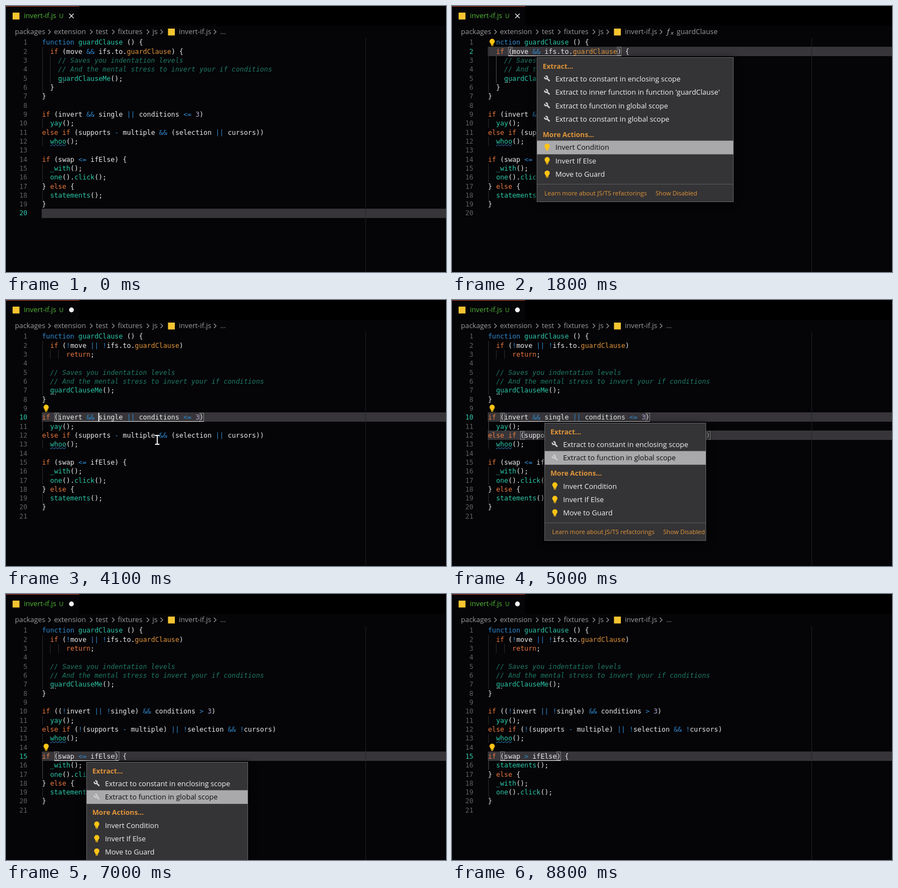
Recreate the animation shown at these times as an HTML page with a canvas. Size 800 by 483 pixels, loop 8.9 s.

```html
<!DOCTYPE html>
<html lang="en">
<head>
<meta charset="utf-8">
<title>Invert if</title>
<style>
html, body { margin: 0; width: 100%; height: 100%; overflow: hidden; background: #050407; }
canvas { display: block; }
</style>
</head>
<body>
<canvas id="stage" width="800" height="483"></canvas>
<script>
const ctx = document.getElementById('stage').getContext('2d');
const LOOP = 8900, STEP = 100, BLINK = 530;
const LEFT = 65.5, TOP = 58, CHAR = 7.34, ROW = 16.32;
const MONO = '12.2px "DejaVu Sans Mono", monospace';
const UI = '13px "Open Sans", "Noto Sans", sans-serif';
const CRUMB = '12.8px "Open Sans", "Noto Sans", sans-serif';
const BOLD = 'bold 12.6px "Open Sans", "Noto Sans", sans-serif';
const SMALL = '11.1px "Open Sans", "Noto Sans", sans-serif';
const C = {
  bg: '#050407', text: '#ececec', blue: '#2f8bd0', teal: '#2bc9aa', orange: '#e9793f',
  gold: '#e0953a', comment: '#1d7a66', number: '#b3a5d3', gutter: '#5f6064', row: '#373539',
  guide: '#29292c', activeGuide: '#48484b', crumb: '#9a9a9c', bulb: '#ffc414', js: '#f5c431'
};

const guardBefore = `function guardClause () {
  if (move && ifs.to.guardClause) {
    // Saves you indentation levels
    // And the mental stress to invert your if conditions
    guardClauseMe();
  }
}
`;
const guardAfter = `function guardClause () {
  if (!move || !ifs.to.guardClause)
      return;
  
  // Saves you indentation levels
  // And the mental stress to invert your if conditions
  guardClauseMe();
}
`;
const chain = `
if (invert && single || conditions <= 3)
  yay();
else if (supports - multiple && (selection || cursors))
  whoo();
`;
const chainInverted = `
if ((!invert || !single) && conditions > 3)
  yay();
else if (!(supports - multiple) || !selection && !cursors)
  whoo();
`;
const swap = `
if (swap <= ifElse) {
  _with();
  one().click();
} else {
  statements();
}
`;
const swapped = `
if (swap > ifElse) {
  statements();
} else {
  _with();
  one().click();
}
`;
const file = (...parts) => parts.join('').split('\n');
const untouched = file(guardBefore, chain, swap);
const guarded = file(guardAfter, chain, swap);
const inverted = file(guardAfter, chainInverted, swap);
const finished = file(guardAfter, chainInverted, swapped);

// pairs: [line, column, line, column] of matching brackets
const scenes = [
  { at: -600, code: untouched, lines: [20], carets: [[20, 0]], pairs: [] },
  { at: 500, code: untouched, lines: [2], carets: [[2, 12]], pairs: [[2, 5, 2, 32]], inFunction: true, bulb: true },
  { at: 2300, code: guarded, lines: [5], carets: [[5, 12]], pairs: [[1, 24, 8, 0]], inFunction: true, bulb: true },
  { at: 3600, code: guarded, lines: [10], carets: [[10, 14]], pairs: [[10, 3, 10, 39]], bulb: true },
  { at: 4300, code: guarded, lines: [10, 12], carets: [[10, 14], [12, 28]], pairs: [[10, 3, 10, 39], [12, 8, 12, 54]], bulb: true },
  { at: 5400, code: inverted, lines: [10, 12], carets: [[10, 16], [12, 28]], pairs: [[10, 4, 10, 23], [12, 10, 12, 30]], underline: '#d98732', bulb: true },
  { at: 6500, code: inverted, lines: [15], carets: [[15, 11]], pairs: [[15, 3, 15, 18]], bulb: true },
  { at: 7900, code: finished, lines: [15], carets: [[15, 11]], pairs: [[15, 3, 15, 17]], bulb: true }
];

const constantScope = 'Extract to constant in enclosing scope';
const globalFunction = 'Extract to function in global scope';
const shortList = [constantScope, globalFunction];
const longList = [constantScope, "Extract to inner function in function 'guardClause'", globalFunction, 'Extract to constant in global scope'];
const actions = ['Invert Condition', 'Invert If Else', 'Move to Guard'];
// picks: the times at which the selection reaches each next item
const menus = [
  { to: 2300, x: 154, y: 93, width: 358, extracts: longList, picks: [1000, 1300, 1400, 1600, 1700, 2000, 2200] },
  { to: 5500, x: 168, y: 223, width: 294, extracts: shortList, picks: [4600, 4900, 5100] },
  { to: 7900, x: 146, y: 305, width: 294, extracts: shortList, picks: [6700, 6900, 7300, 7500] }
];

// Each path is a list of [time, x, y]; the pointer is hidden outside of it
const pointerPaths = [
  [[200, 240, 230], [500, 152, 84], [900, 152, 84]],
  [[2600, 104, 156], [3000, 104, 156], [3500, 170, 213], [3700, 170, 213], [4100, 275, 254], [4600, 275, 254]],
  [[5700, 270, 420], [6000, 216, 373], [6400, 148, 296], [6600, 148, 296]]
];

const rowTop = line => TOP + (line - 1) * ROW;
const colX = col => LEFT + col * CHAR;
const indentOf = text => text.match(/^ */)[0].length;

function rect(x, y, w, h, color) {
  ctx.fillStyle = color;
  ctx.fillRect(x, y, w, h);
}
function label(text, x, y, color, font = UI, align = 'left') {
  ctx.font = font;
  ctx.fillStyle = color;
  ctx.textAlign = align;
  ctx.fillText(text, x, y);
}
function path(points, color, width = 1) {
  ctx.strokeStyle = color;
  ctx.lineWidth = width;
  ctx.beginPath();
  points.forEach(([x, y]) => ctx.lineTo(x, y));
  ctx.stroke();
}
function disc(x, y, r, color) {
  ctx.fillStyle = color;
  ctx.beginPath();
  ctx.arc(x, y, r, 0, 7);
  ctx.fill();
}

function drawBulb(x, y) {
  disc(x, y - 1.8, 4.7, C.bulb);
  rect(x - 2.5, y + 1.5, 5, 3, C.bulb);
  rect(x - 2, y + 5.2, 4, 1.3, C.bulb);
}
function drawWrench(x, y) {
  path([[x - 0.5, y - 0.5], [x + 4.5, y + 4.5]], '#cfcfcf', 2.6);
  ctx.lineWidth = 2.4;
  ctx.beginPath();
  ctx.arc(x - 2, y - 2, 2.5, -1.9, 3.5);
  ctx.stroke();
}

function drawHeader(scene) {
  rect(0, 0, 800, 36, '#000');
  rect(0, 0, 133, 36, C.bg);
  rect(0, 0, 133, 1, '#b2452c');
  rect(12, 12, 12.5, 12.5, C.js);
  label('invert-if.js', 32.5, 22, '#52b936', CRUMB);
  label('U', 96.5, 22, '#52b936', SMALL);
  if (scene.code === untouched) {
    path([[115, 14], [123, 22]], '#eee', 1.3);
    path([[123, 14], [115, 22]], '#eee', 1.3);
  } else {
    disc(119, 18, 4.4, '#f4f4f4');
  }
  const crumbs = [['packages', 17], ['extension', 88], ['test', 164], ['fixtures', 204], ['js', 267], ['invert-if.js', 315]];
  crumbs.forEach(([name, x]) => label(name, x - 0.8, 51, C.crumb, CRUMB));
  for (const x of [79, 155, 195, 258, 283, 380])
    path([[x - 2, 43], [x + 2, 47], [x - 2, 51]], C.crumb, 1.2);
  rect(294.5, 41, 12.5, 12.5, C.js);
  if (scene.inFunction) {
    label('ƒ', 391, 51, '#b9b9bb', 'italic 12px "DejaVu Sans", sans-serif');
    label('x', 397.5, 51.5, '#b9b9bb', 'italic 9.5px "DejaVu Sans", sans-serif');
    label('guardClause', 408.5, 51, C.crumb, CRUMB);
  } else {
    label('…', 389.5, 51, C.crumb, CRUMB);
  }
}

const tokenPattern = /(\/\/.*)|\b(if|else|return)\b|\b(function)\b|(?<=\.)(guardClause)|(\w+(?= ?\())|(\d)|(&&|\|\||<=|>|!|-)|\w+|[^\s\w]/g;
const tokenColors = [C.comment, C.orange, C.blue, C.gold, C.teal, C.number, C.blue];

function drawLine(text, line) {
  const baseline = rowTop(line) + 12.4;
  for (const match of text.matchAll(tokenPattern)) {
    const kind = match.slice(1).findIndex(Boolean);
    label(match[0], colX(match.index), baseline, tokenColors[kind] || C.text, kind === 0 ? 'italic ' + MONO : MONO);
  }
  const x = colX(indentOf(text));
  if (text.includes('guardClauseMe'))
    for (let i = 0; i < 3; i++) rect(x + 1 + i * 4, baseline + 2, 1.5, 1.5, '#b5b5b5');
  if (text.includes('whoo')) {
    const wave = Array.from({ length: 30 }, (_, i) => [x + i, baseline + 2.8 + 1.2 * Math.sin(i * 1.05)]);
    path(wave, C.blue, 1);
  }
}

function drawGuides(scene) {
  const { code, lines: [active] } = scene;
  const activeIndent = indentOf(code[active - 1]);
  let inBlock = false;
  code.forEach((text, i) => {
    const indent = indentOf(text);
    if (i === active) inBlock = true;
    if (indent <= activeIndent) inBlock = false;
    for (let col = 0; col < indent; col += 2)
      rect(Math.round(colX(col)), rowTop(i + 1), 1, ROW,
        inBlock && col === activeIndent ? C.activeGuide : C.guide);
  });
}

function drawPairs(scene) {
  scene.pairs.forEach(([line1, col1, line2, col2], i) => {
    ctx.strokeStyle = '#808082';
    ctx.lineWidth = 1;
    for (const [line, col] of [[line1, col1], [line2, col2]])
      ctx.strokeRect(Math.round(colX(col)) + 0.5, Math.round(rowTop(line)) + 0.5, 7, 15);
    const under = Math.round(rowTop(line1 + 1)) - 0.5;
    if (line1 !== line2)
      path([[colX(col1), under], [LEFT + 0.2, under], [LEFT + 0.2, rowTop(line2)]], '#f0f0f0', 1.3);
    else if (i === 0)
      path([[colX(col1), under], [colX(col2 + 1), under]], scene.underline || '#e8e8e8', 1.2);
  });
}

function drawEditor(scene, t, menuOpen) {
  scene.lines.forEach(line => rect(65, Math.floor(rowTop(line)), 735, 17, C.row));
  rect(653.5, TOP, 1, 425, '#242427');
  drawGuides(scene);
  scene.code.forEach((text, i) => {
    const active = i + 1 === scene.lines[0];
    label(i + 1, 38.8, rowTop(i + 1) + 12.4, active ? C.teal : C.gutter, MONO, 'right');
    drawLine(text, i + 1);
  });
  drawPairs(scene);
  if (scene.bulb) {
    const top = rowTop(scene.lines[0] - 1);
    rect(66.5, top, 13.5, ROW - 1, C.bg);
    drawBulb(73, top + 8);
  }
  if (!menuOpen && (t - scene.at) % (2 * BLINK) < BLINK)
    scene.carets.forEach(([line, col]) => rect(colX(col) - 0.5, rowTop(line), 1.7, ROW, '#fff'));
}

function drawMenu({ x, y, width, extracts, picks }, t) {
  const selected = picks.filter(time => time <= t).length - 1;
  const split = 39 + extracts.length * 24.4;
  const height = split + 126.4;
  ctx.save();
  ctx.shadowColor = '#000';
  ctx.shadowBlur = 12;
  ctx.shadowOffsetY = 3;
  rect(x, y, width, height, '#343335');
  ctx.restore();
  ctx.strokeStyle = '#626164';
  ctx.lineWidth = 1;
  ctx.strokeRect(x + 0.5, y + 0.5, width - 1, height - 1);
  label('Extract...', x + 11, y + 21, C.gold, BOLD);
  label('More Actions...', x + 11, y + split + 8.3, C.gold, BOLD);
  [...extracts, ...actions].forEach((name, i) => {
    const isExtract = i < extracts.length;
    const middle = y + 39.3 + i * 24.4 + (isExtract ? 0 : 27);
    if (i === selected) rect(x + 0.5, middle - 12.4, width - 1, 24.8, '#a9a8aa');
    (isExtract ? drawWrench : drawBulb)(x + 19, middle - 0.5);
    label(name, x + 34, middle + 4.4, i === selected ? '#0b0b0b' : '#f4f4f4');
  });
  rect(x + 1, y + height - 33, width - 2, 1, '#5a595c');
  label('Learn more about JS/TS refactorings', x + 14, y + height - 12, C.gold, SMALL);
  label('Show Disabled', x + 216, y + height - 12, C.gold, SMALL);
}

function drawArrow(x, y) {
  ctx.beginPath();
  [[0, 0], [0, 15], [3.5, 11.8], [6, 17.5], [8.5, 16.4], [6, 11], [10.8, 10.8]]
    .forEach(([dx, dy]) => ctx.lineTo(x + dx, y + dy));
  ctx.closePath();
  ctx.fillStyle = '#111';
  ctx.fill();
  ctx.strokeStyle = '#fff';
  ctx.lineWidth = 1.4;
  ctx.stroke();
}
function drawBeam(x, y) {
  for (const [color, width] of [['#111', 4], ['#fff', 1.8]]) {
    path([[x, y - 8], [x, y + 8]], color, width);
    path([[x - 4, y - 8], [x + 4, y - 8]], color, width);
    path([[x - 4, y + 8], [x + 4, y + 8]], color, width);
  }
}
function drawPointer(t) {
  for (const keys of pointerPaths) {
    const next = keys.findIndex(key => key[0] > t);
    if (next < 1) continue;
    const [t0, x0, y0] = keys[next - 1], [t1, x1, y1] = keys[next];
    const p = (t - t0) / (t1 - t0), eased = p * p * (3 - 2 * p);
    const draw = t >= 2600 && t < 3000 ? drawArrow : drawBeam;
    draw(x0 + (x1 - x0) * eased, y0 + (y1 - y0) * eased);
  }
}

function render(now) {
  const t = Math.floor((now % LOOP) / STEP) * STEP;
  const scene = scenes.filter(s => s.at <= t).pop();
  const menu = menus.find(m => m.picks[0] <= t && t < m.to);
  rect(0, 0, 800, 483, C.bg);
  drawHeader(scene);
  drawEditor(scene, t, Boolean(menu));
  if (menu) drawMenu(menu, t);
  drawPointer(t);
}

const start = performance.now();
function tick() {
  render(performance.now() - start);
  requestAnimationFrame(tick);
}
tick();
</script>
</body>
</html>
```
